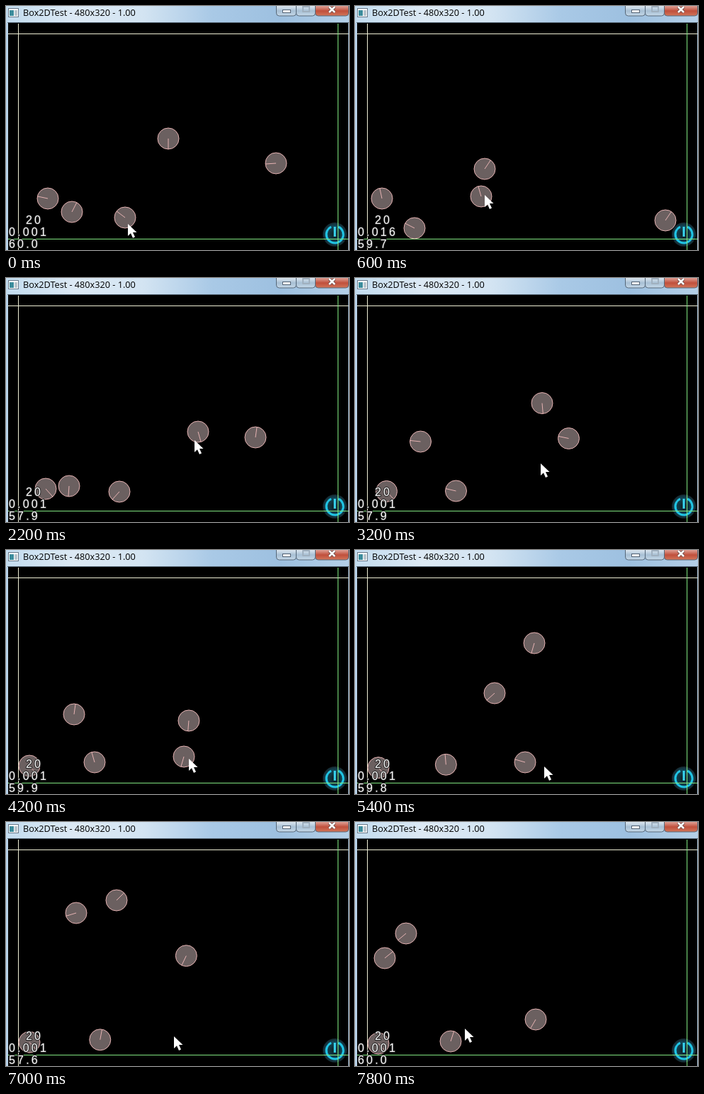
An HTML page with a canvas for the animation above (8000 ms loop, 484 by 346 pixels).

```html
<!DOCTYPE html>
<html lang="en">
<head>
<meta charset="utf-8">
<title>Physics test</title>
<style>
  html, body { margin: 0; width: 100%; height: 100%; overflow: hidden; background: #000; }
  canvas { display: block; }
</style>
</head>
<body>
<canvas id="stage" width="484" height="346"></canvas>
<script>
const ctx = document.getElementById('stage').getContext('2d');
const LOOP = 8000, STEP = 200, HALF_GRAVITY = 32, RADIUS = 15;

// Each key: seconds, x, y, spoke angle in degrees (clockwise from the right).
// Gravity bends the path between keys, so only impacts and grabs are listed.
const balls = [
  [[0, 59, 273, 192], [.6, 38, 273, 258], [1.3, 33, 315, 330], [2.2, 56, 299, 408],
   [4.2, 33, 306, 408], [7.8, 33, 314, 408]],
  [[0, 93, 292, -63], [.6, 84, 315, -153], [2.2, 89, 295, -266], [4.2, 96, 233, -82],
   [5.4, 197, 203, -222], [7, 99, 129, -197], [7.4, 32, 132, -197], [7.8, 72, 158, -220]],
  [[0, 168, 300, 217], [.6, 178, 270, 254], [2.2, 271, 218, 74], [2.7, 268, 56, 80],
   [3.7, 260, 315, 90], [5.4, 253, 132, 106], [7.8, 255, 280, 120]],
  [[0, 229, 188, 90], [.6, 183, 231, -56], [1.4, 170, 315, 40], [2.2, 160, 303, 132],
   [4.2, 125, 301, 254], [7.8, 135, 311, 288]],
  [[0, 381, 223, 176], [.6, 438, 304, 304], [.75, 453, 315, 300], [2.2, 352, 226, 278],
   [4.2, 251, 293, 106], [5.4, 240, 301, 196], [7, 156, 111, 315], [7.8, 42, 193, 321]]
];
const pointer = [[0, 172, 309], [.6, 183, 268], [2.2, 266, 230], [4.2, 258, 296],
  [5.4, 267, 307], [7, 237, 304], [7.8, 155, 293]];
const rates = [[0, '60.0'], [.4, '59.7'], [1.6, '57.9'], [4, '59.9'], [5, '59.8'],
  [6.6, '57.6'], [7.2, '60.0']];

function sample(keys, t) {
  const next = keys.findIndex(key => key[0] > t);
  if (next < 0) return { values: keys.at(-1), arc: 0 };
  const a = keys[next - 1], b = keys[next];
  const k = (t - a[0]) / (b[0] - a[0]);
  return {
    values: a.map((v, i) => v + (b[i] - v) * k),
    arc: Math.min(a[2], b[2]) < 290 ? HALF_GRAVITY * (t - a[0]) * (b[0] - t) : 0
  };
}

function rect(color, x, y, w, h) {
  ctx.fillStyle = color;
  ctx.fillRect(x, y, w, h);
}

function line(color, x1, y1, x2, y2, width = 1) {
  ctx.strokeStyle = color;
  ctx.lineWidth = width;
  ctx.beginPath();
  ctx.moveTo(x1, y1);
  ctx.lineTo(x2, y2);
  ctx.stroke();
}

function circle(x, y, r, fill, stroke) {
  ctx.beginPath();
  ctx.arc(x, y, r, 0, Math.PI * 2);
  ctx.fillStyle = fill;
  ctx.fill();
  if (!stroke) return;
  ctx.strokeStyle = stroke;
  ctx.lineWidth = 1;
  ctx.stroke();
}

function gradient(x1, y1, x2, y2, colors) {
  const g = ctx.createLinearGradient(x1, y1, x2, y2);
  colors.forEach((color, i) => g.addColorStop(i / (colors.length - 1), color));
  return g;
}

function captionButton(x, w, colors) {
  ctx.beginPath();
  ctx.roundRect(x + .5, -4, w, 18, 4);
  ctx.fillStyle = gradient(0, 0, 0, 14, colors);
  ctx.fill();
  ctx.strokeStyle = '#566879';
  ctx.lineWidth = 1;
  ctx.stroke();
}

function drawWindow() {
  rect('#b9d3ea', 0, 0, 484, 346);
  rect(gradient(0, 0, 484, 0, ['#c3dcef', '#dce9f4', '#d3e4f2', '#a9c9e6', '#9dc0e0', '#b5d0e8']), 0, 0, 484, 24);
  rect('#5a6b7a', 2, 23, 482, 1);
  rect('#000', 3, 24, 480, 322);

  rect('#667788', 3, 3, 15, 13);
  rect('#fff', 4, 4, 13, 11);
  rect('#3c8c9c', 5, 6, 6, 8);
  rect('#b8c4cc', 12, 6, 4, 8);

  ctx.font = '12.7px "Open Sans", "Noto Sans", sans-serif';
  ctx.letterSpacing = '0px';
  ctx.fillStyle = '#000';
  ctx.fillText('Box2DTest - 480x320 - 1.00', 24, 14);

  const glass = ['#dce7f0', '#a7bfd4', '#c6d9e9'];
  captionButton(381, 28, glass);
  captionButton(409, 27, glass);
  captionButton(436, 47, ['#e0a095', '#c0503c', '#d2755a']);
  rect('#536273', 390, 5, 12, 5);
  rect('#fff', 391, 6, 10, 3);
  ctx.lineWidth = 2;
  ctx.strokeStyle = '#a0b0bf';
  ctx.strokeRect(419, 1, 9, 7);
  for (const [color, width] of [['#6b4a48', 4.5], ['#fff', 2.5]]) {
    line(color, 456, 1, 464, 9, width);
    line(color, 464, 1, 456, 9, width);
  }
}

function drawPowerButton() {
  const glow = ctx.createRadialGradient(464, 324, 3, 464, 324, 18);
  glow.addColorStop(0, '#10252c');
  glow.addColorStop(.6, '#12485a');
  glow.addColorStop(1, '#182024');
  circle(464, 324, 17, glow);
  ctx.strokeStyle = '#20c4e4';
  ctx.lineWidth = 3;
  ctx.beginPath();
  ctx.arc(464, 324, 12, -Math.PI * .36, Math.PI * 1.36);
  ctx.stroke();
  line('#38d8f4', 464, 313, 464, 327, 3);
}

function drawWalls() {
  const pale = '#efefd6', green = '#80e680';
  line(pale, 3, 39.5, 483, 39.5);
  line(pale, 17.5, 25, 17.5, 346);
  line(green, 3, 330.5, 483, 330.5);
  line(green, 468.5, 25, 468.5, 346);
}

function drawBall(keys, t) {
  const { values: [, x, y, degrees], arc } = sample(keys, t);
  const angle = degrees * Math.PI / 180;
  ctx.save();
  ctx.translate(x, y - arc);
  circle(0, 0, RADIUS, '#6b6060', '#e6b3b3');
  line('#e6b3b3', 0, 0, RADIUS * Math.cos(angle), RADIUS * Math.sin(angle));
  ctx.restore();
}

function drawCounters(t) {
  ctx.font = '16px "Liberation Sans", Arial, sans-serif';
  ctx.letterSpacing = '3.2px';
  ctx.lineJoin = 'round';
  ctx.lineWidth = 2;
  ctx.strokeStyle = '#222';
  ctx.fillStyle = '#fff';
  const frameTime = t >= .4 && t < 1 ? '0.016' : '0.001';
  const rate = rates.findLast(([start]) => start <= t)[1];
  [['20', 28, 309], [frameTime, 4, 326], [rate, 4, 343]].forEach(args => {
    ctx.strokeText(...args);
    ctx.fillText(...args);
  });
}

function drawPointer(t) {
  const [, x, y] = sample(pointer, t).values;
  ctx.save();
  ctx.translate(x, y);
  ctx.fillStyle = '#fff';
  ctx.fill(new Path2D('M0 0V17L4 13.2L7 20L10 18.6L7 12H12.5Z'));
  ctx.restore();
}

function draw(now) {
  const t = Math.floor(now % LOOP / STEP) * STEP / 1000;
  drawWindow();
  drawPowerButton();
  drawWalls();
  balls.forEach(keys => drawBall(keys, t));
  drawCounters(t);
  drawPointer(t);
}

let start;
function tick(now) {
  start ??= now;
  draw(now - start);
  requestAnimationFrame(tick);
}
requestAnimationFrame(tick);
</script>
</body>
</html>
```
